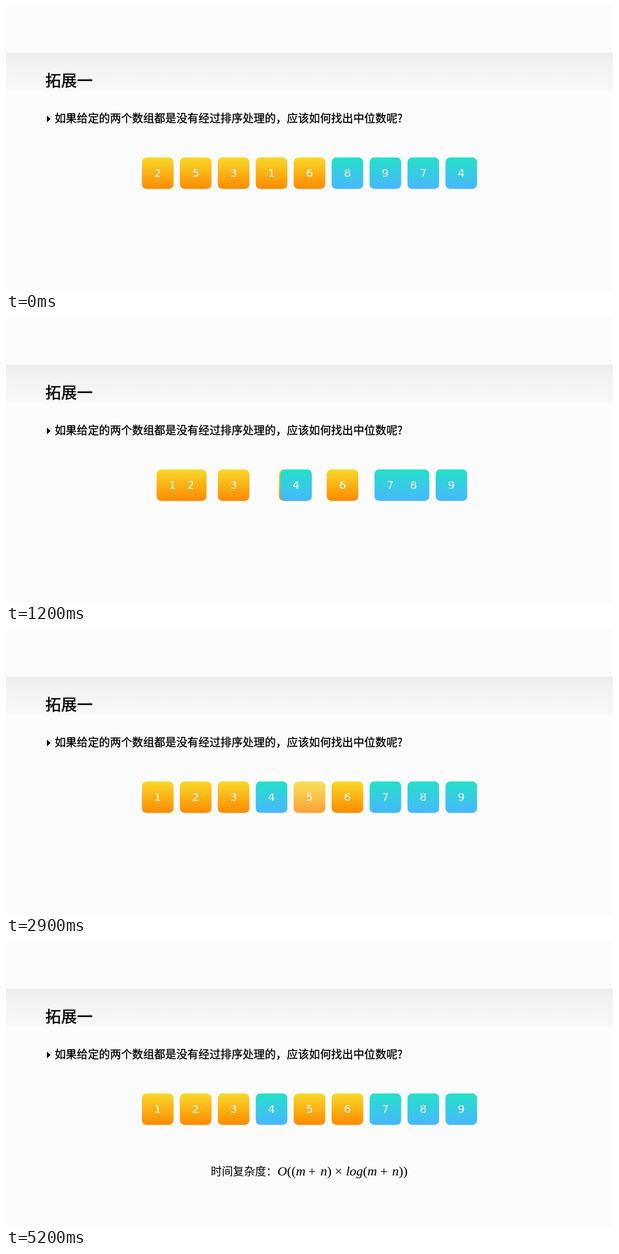
These frames come from a looping animation (1093x512 px, 5.3 s). An HTML page:

```html
<!DOCTYPE html>
<html lang="zh-CN">
<head>
<meta charset="utf-8">
<style>
html, body { margin: 0; width: 100%; height: 100%; overflow: hidden; background: #fcfcfc; }
svg { display: block; width: 1093px; height: 512px; }
text { font: 19.92px "Noto Sans CJK SC", "Noto Sans CJK", sans-serif; white-space: pre; }
.medium { stroke: #000; stroke-width: .35px; }
#title { font-size: 28.46px; stroke-width: .5px; }
#tiles text { font-family: "DejaVu Sans", sans-serif; fill: #fff; text-anchor: middle; }
.math { font: 24px "Liberation Serif", "Times New Roman", serif; }
.math .it { font-style: italic; }
</style>
</head>
<body>
<svg viewBox="0 0 1093 512" lang="zh-CN">
  <defs>
    <linearGradient id="band" x2="0" y2="1">
      <stop stop-color="#f0edf0"/>
      <stop offset=".5" stop-color="#f4f3f6"/>
      <stop offset=".92" stop-color="#f8f8fa"/>
      <stop offset="1" stop-color="#fcfcfd"/>
    </linearGradient>
    <linearGradient id="orange" x2="0" y2="1">
      <stop stop-color="#f8d92a"/><stop offset="1" stop-color="#ff8a00"/>
    </linearGradient>
    <linearGradient id="teal" x2="0" y2="1">
      <stop stop-color="#24e0c8"/><stop offset="1" stop-color="#48b7ff"/>
    </linearGradient>
  </defs>
  <rect width="1093" height="512" fill="#fcfcfc"/>
  <rect y="84" width="1093" height="72" fill="url(#band)"/>
  <text id="title" class="medium" x="70.8" y="145.2">拓展一</text>
  <path d="M74 198.2L79.8 203.7L74 209.2Z" stroke="#000" stroke-width=".6" stroke-linejoin="round"/>
  <text class="medium" x="87.7" y="210.2">如果给定的两个数组都是没有经过排序处理的，应该如何找出中位数呢?</text>
  <g id="tiles"></g>
  <g id="complexity">
    <text x="368.8" y="421">时间复杂度：</text>
    <text class="math" y="421"><tspan class="it" x="488.7">O</tspan>((<tspan class="it">m</tspan><tspan x="544.2">+</tspan><tspan class="it" x="566.2">n</tspan>)<tspan x="592">×</tspan><tspan class="it" x="612.2">log</tspan>(<tspan class="it">m</tspan><tspan x="673.8">+</tspan><tspan class="it" x="695.3">n</tspan>))</text>
  </g>
</svg>
<script>
const LOOP = 5300, STEP = 100;
const FIRST_X = 273.2, PITCH = 68.32, SIZE = 56.9, TOP = 272.9;
const DIGITS = [2, 5, 3, 1, 6, 8, 9, 7, 4];
const ORANGE_COUNT = 5;

const clamp = v => Math.min(1, Math.max(0, v));
const progress = (t, start, end) => clamp((t - start) / (end - start));

// cubic-bezier(.42, 0, .58, 1), solved by bisection
function easeInOut(x) {
  let low = 0, high = 1, u = .5;
  for (let i = 0; i < 24; i++) {
    u = (low + high) / 2;
    const v = 1 - u;
    if (1.26 * u * v * v + 1.74 * u * u * v + u ** 3 < x) low = u; else high = u;
  }
  return u * u * (3 - 2 * u);
}

function add(parent, name, attrs) {
  const el = document.createElementNS("http://www.w3.org/2000/svg", name);
  for (const key in attrs) el.setAttribute(key, attrs[key]);
  return parent.appendChild(el);
}

const layer = document.getElementById("tiles");
const complexity = document.getElementById("complexity");
const tiles = DIGITS.map((digit, slot) => {
  const el = add(layer, "g", {});
  add(el, "rect", {
    x: -SIZE / 2, y: TOP, width: SIZE, height: SIZE, rx: 8.5,
    fill: slot < ORANGE_COUNT ? "url(#orange)" : "url(#teal)"
  });
  add(el, "text", { x: 0, y: 308.2 }).textContent = digit;
  return { el, digit, from: slot, to: digit - 1 };
});

function draw(t) {
  const sort = easeInOut(progress(t, 600, 1400));
  const blink = Math.abs(1 - 2 * progress(t, 2010, 3010));
  for (const { el, digit, from, to } of tiles) {
    const slot = from + (to - from) * sort;
    el.setAttribute("transform", `translate(${FIRST_X + PITCH * slot} 0)`);
    el.setAttribute("opacity", digit === 5 ? blink : 1);
  }
  complexity.setAttribute("opacity", progress(t, 3200, 3600));
}

const startTime = performance.now();
function tick() {
  const t = (performance.now() - startTime) % LOOP;
  draw(Math.floor(t / STEP) * STEP);
  requestAnimationFrame(tick);
}
tick();
</script>
</body>
</html>
```
